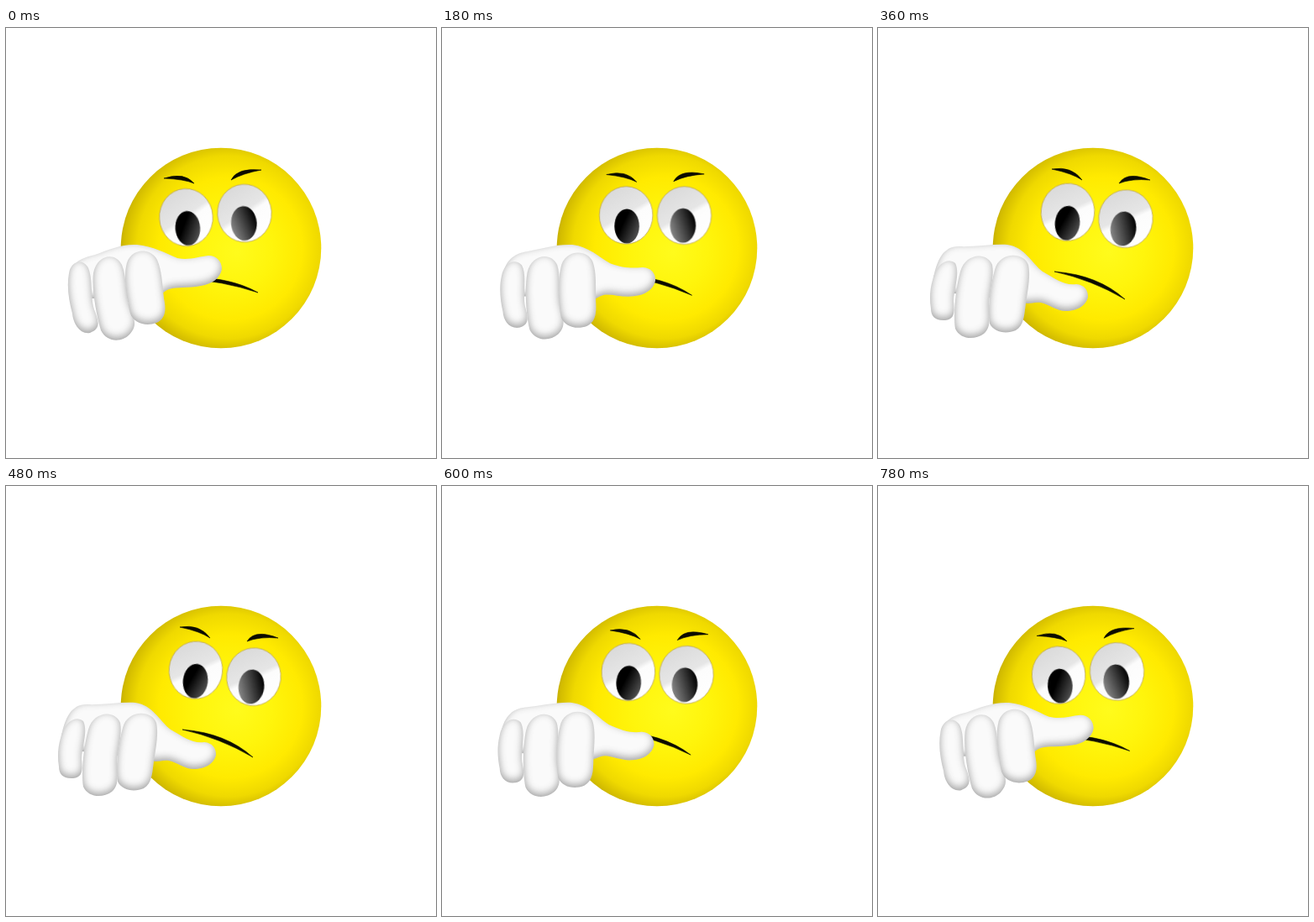
An HTML page without scripts for the animation above (0.84 s loop, 512 px wide and 512 px high).

```html
<!DOCTYPE html>
<html lang="en">
<head>
<meta charset="utf-8">
<title>Thumb sway</title>
<style>
  html, body { margin: 0; width: 100%; height: 100%; overflow: hidden; background: #fff; }
  svg { display: block; width: 100%; height: 100%; }

  /* A sine swing held in 14 steps; its peak passes slightly beyond pose b. */
  .shape, .eye {
    animation: 840ms infinite linear(
      0 0% 7.143%, .052 7.143% 14.286%, .198 14.286% 21.429%, .409 21.429% 28.571%,
      .643 28.571% 35.714%, .855 35.714% 42.857%, 1 42.857% 50%, 1.052 50% 57.143%,
      1 57.143% 64.286%, .855 64.286% 71.429%, .643 71.429% 78.571%,
      .409 78.571% 85.714%, .198 85.714% 92.857%, .052 92.857% 100%);
  }
  .shape { animation-name: morph; }
  .eye { animation-name: turn; }
  @keyframes morph { from { d: var(--a); } to { d: var(--b); } }
  @keyframes turn { from { transform: var(--a); } to { transform: var(--b); } }

  .left.eye {
    --a: translate(214.5px, 225.5px) rotate(-4deg);
    --b: translate(226px, 219.2px) rotate(6.5deg);
  }
  .right.eye {
    --a: translate(284px, 220.5px) rotate(-4deg);
    --b: translate(295px, 227.2px) rotate(6.5deg);
  }
  .left.brow {
    --a: path("M188 179 Q212 171 224 185 Q212 180 188 179Z");
    --b: path("M207 168 Q231 164 243 181 Q231 173 207 168Z");
  }
  .right.brow {
    --a: path("M268 181 Q275 166 304 169 Q282 173 268 181Z");
    --b: path("M287 185 Q296 170 324 181 Q302 179 287 185Z");
  }
  .mouth {
    --a: path("M209 298 Q262 294 300 315 Q258 301 209 298Z");
    --b: path("M210 290 Q262 294 294 323 Q255 300 210 290Z");
  }
  .palm {
    --a: path("M76 296 C78 278 90 274 106 270 C122 264 138 257 156 258 C175 260 190 268 204 274 C218 277 230 272 241 271 C251 271 257 278 257 287 C255 298 245 305 232 307 C216 310 204 308 194 311 C186 314 184 320 178 322 L100 322 C84 322 76 310 76 296Z");
    --b: path("M66 298 C70 276 78 260 96 260 C114 261 136 257 154 258 C175 261 183 280 196 290 C212 299 222 307 236 305 C246 306 250 312 250 320 C248 331 236 337 224 337 C212 337 204 329 194 327 C188 326 182 328 178 328 L100 316 C80 318 68 310 66 298Z");
  }
  .little {
    --a: path("M75 292 C77 278 90 274 97 284 C104 296 100 318 105 335 C110 348 114 358 100 363 C88 365 80 352 79 340 C75 325 72 308 75 292Z");
    --b: path("M65 300 C69 282 82 272 92 280 C98 292 90 312 90 325 C91 338 92 346 80 348 C68 349 63 343 63 334 C61 322 62 310 65 300Z");
  }
  .middle {
    --a: path("M104 292 C108 270 130 266 138 282 C144 296 142 318 147 332 C153 346 157 354 147 365 C137 375 120 374 113 360 C107 340 102 310 104 292Z");
    --b: path("M98 290 C104 268 130 266 136 282 C139 298 132 316 132 332 C132 346 135 356 126 364 C115 372 98 371 92 358 C89 340 93 308 98 290Z");
  }
  .index {
    --a: path("M143 284 C146 262 172 260 180 276 C186 290 186 306 188 322 C191 336 190 346 179 351 C166 356 152 351 148 340 C144 322 140 300 143 284Z");
    --b: path("M139 288 C144 266 174 266 179 282 C182 296 178 314 176 328 C174 342 174 354 164 360 C152 365 138 362 133 352 C130 334 134 306 139 288Z");
  }
</style>
</head>
<body>
<svg viewBox="0 0 512 512">
  <defs>
    <radialGradient id="skin" cx=".53" cy=".49" r=".55" fx=".58" fy=".52">
      <stop offset="0" stop-color="#fffb1c"/>
      <stop offset=".35" stop-color="#fff50c"/>
      <stop offset=".65" stop-color="#ffea00"/>
      <stop offset=".83" stop-color="#efd900"/>
      <stop offset=".94" stop-color="#d3bc00"/>
      <stop offset="1" stop-color="#b8a000"/>
    </radialGradient>
    <linearGradient id="white" x1=".2" y1="0" x2=".75" y2="1">
      <stop offset="0" stop-color="#d8d8d8"/>
      <stop offset=".48" stop-color="#e6e6e6"/>
      <stop offset=".56" stop-color="#fcfcfc"/>
      <stop offset="1" stop-color="#fff"/>
    </linearGradient>
    <linearGradient id="darkPupil" x1=".2" y1=".3" x2="1" y2=".8">
      <stop offset=".2" stop-color="#000"/>
      <stop offset="1" stop-color="#585858"/>
    </linearGradient>
    <linearGradient id="greyPupil" x1="0" y1=".75" x2=".9" y2=".35">
      <stop offset="0" stop-color="#8c8c8c"/>
      <stop offset="1" stop-color="#0a0a0a"/>
    </linearGradient>
    <!-- Soft grey rim inside each part, heavier below -->
    <filter id="round" x="-10%" y="-10%" width="120%" height="120%" color-interpolation-filters="sRGB">
      <feGaussianBlur in="SourceAlpha" stdDeviation="5"/>
      <feOffset dy="-3"/>
      <feColorMatrix values="0 0 0 0 .1  0 0 0 0 .1  0 0 0 0 .1  0 0 0 -.4 .4"/>
      <feComposite in2="SourceAlpha" operator="in" result="rim"/>
      <feMerge>
        <feMergeNode in="SourceGraphic"/>
        <feMergeNode in="rim"/>
      </feMerge>
    </filter>
  </defs>

  <circle cx="256" cy="262" r="119.3" fill="url(#skin)"/>

  <g stroke="#b9a35a" stroke-width=".8">
    <g class="left eye">
      <ellipse rx="31.8" ry="34.2" fill="url(#white)"/>
      <ellipse cx="1" cy="13" rx="14.8" ry="20.5" fill="url(#darkPupil)" stroke="none"/>
    </g>
    <g class="right eye">
      <ellipse rx="32.2" ry="34.4" fill="url(#white)"/>
      <ellipse cx="-1.5" cy="12" rx="15.3" ry="20.5" fill="url(#greyPupil)" stroke="none"/>
    </g>
  </g>

  <g fill="#0c0c00" stroke="#0c0c00" stroke-width=".6">
    <path class="shape left brow"/>
    <path class="shape right brow"/>
    <path class="shape mouth"/>
  </g>

  <g fill="#fafafa">
    <path class="shape palm" filter="url(#round)"/>
    <path class="shape little" filter="url(#round)"/>
    <path class="shape middle" filter="url(#round)"/>
    <path class="shape index" filter="url(#round)"/>
  </g>
</svg>
</body>
</html>
```
